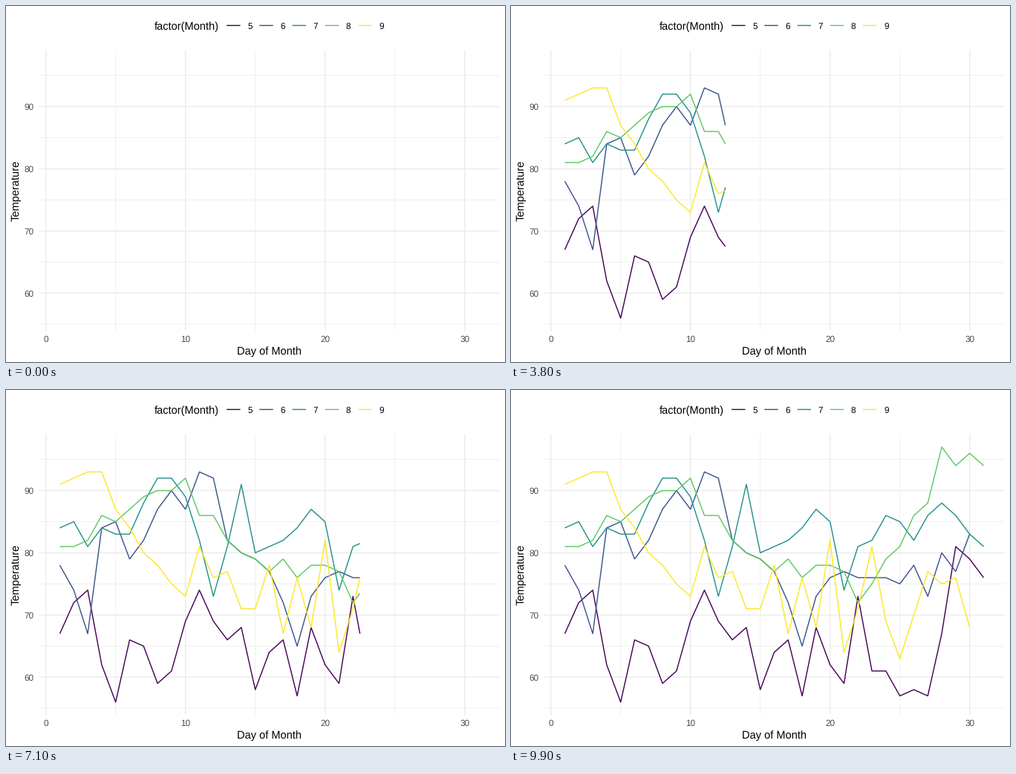
Recreate the animation shown at these times as a matplotlib script. Size 672 by 480 pixels, loop 10000 ms.

```python
import numpy as np
import matplotlib.pyplot as plt
from matplotlib.animation import FuncAnimation

plt.rcParams.update({
    "font.family": "Liberation Sans",
    "text.hinting": "none",
    "path.snap": False,
    "lines.solid_capstyle": "butt",
    "lines.solid_joinstyle": "round",
})

W, H, DPI = 672, 480, 96
FRAMES, INTERVAL = 100, 100
LEFT, RIGHT, TOP, BOTTOM = 44.27, 664.67, 59.7, 438.0
THICK, THIN = 1.067, 0.533
GRID, TICK = "#ebebeb", "#4d4d4d"

may = [67, 72, 74, 62, 56, 66, 65, 59, 61, 69, 74, 69, 66, 68, 58, 64,
       66, 57, 68, 62, 59, 73, 61, 61, 57, 58, 57, 67, 81, 79, 76]
june = [78, 74, 67, 84, 85, 79, 82, 87, 90, 87, 93, 92, 82, 80, 79,
        77, 72, 65, 73, 76, 77, 76, 76, 76, 75, 78, 73, 80, 77, 83]
july = [84, 85, 81, 84, 83, 83, 88, 92, 92, 89, 82, 73, 81, 91, 80, 81,
        82, 84, 87, 85, 74, 81, 82, 86, 85, 82, 86, 88, 86, 83, 81]
august = [81, 81, 82, 86, 85, 87, 89, 90, 90, 92, 86, 86, 82, 80, 79, 77,
          79, 76, 78, 78, 77, 72, 75, 79, 81, 86, 88, 97, 94, 96, 94]
september = [91, 92, 93, 93, 87, 84, 80, 78, 75, 73, 81, 76, 77, 71, 71,
             78, 67, 76, 68, 82, 64, 71, 81, 69, 63, 70, 77, 75, 76, 68]
temps = [may, june, july, august, september]
colors = ["#440154", "#3b528b", "#21908c", "#5dc863", "#fde725"]

# Each day lands on a whole frame, with even steps in between.
DAYS = np.arange(1, 32)
DAY_FRAMES = [round((d - 1) * (FRAMES - 1) / 30) for d in DAYS]


def px(day):
    return LEFT + (np.asarray(day) + 0.5) / 33 * (RIGHT - LEFT)


def py(temp):
    return TOP + (99.05 - np.asarray(temp)) / 45.1 * (BOTTOM - TOP)


fig = plt.figure(figsize=(W / DPI, H / DPI), dpi=DPI, facecolor="white")
ax = fig.add_axes([0, 0, 1, 1])
ax.axis("off")


def label(x, y, text, size=11, color="black", ha="left", **kw):
    ax.text(x, y, text, size=size, color=color, ha=ha, va="baseline", **kw)


def draw_grid(days, degrees, width):
    for t in degrees:
        ax.plot([LEFT, RIGHT], [py(t)] * 2, color=GRID, lw=width)
    for d in days:
        ax.plot([px(d)] * 2, [TOP, BOTTOM], color=GRID, lw=width)


draw_grid((5, 15, 25), range(55, 96, 10), THIN)
draw_grid((0, 10, 20, 30), range(60, 91, 10), THICK)

for d in (0, 10, 20, 30):
    label(px(d), 453, str(d), 8.8, TICK, "center")
for t in (60, 70, 80, 90):
    label(37.67, py(t) + 4.2, str(t), 8.8, TICK, "right")

mid_x, mid_y = (LEFT + RIGHT) / 2, (TOP + BOTTOM) / 2
label(mid_x, 470, "Day of Month", ha="center")
ax.text(18, mid_y, "Temperature", size=11, rotation=90, ha="right",
        va="center", rotation_mode="default").remove()
label(18, mid_y, "Temperature", ha="center", rotation=90,
      rotation_mode="anchor")

label(200.2, 32, "factor(Month)")
for i, color in enumerate(colors):
    x = 297.1 + 44.22 * i
    ax.plot([x, x + 18.43], [26.3, 26.3], color=color, lw=THICK)
    label(x + 28.1, 31, str(5 + i), 8.8)

lines = [ax.plot([], [], color=c, lw=THICK)[0] for c in colors]
ax.set_xlim(0, W)
ax.set_ylim(H, 0)


def update(frame):
    now = np.interp(frame, DAY_FRAMES, DAYS)
    for line, temp in zip(lines, temps):
        days = DAYS[:len(temp)]
        past = days[days < now]
        xs = np.append(past, min(now, days[-1])) if now > 1 else []
        line.set_data(px(xs), py(np.interp(xs, days, temp)))
    return lines


anim = FuncAnimation(fig, update, frames=FRAMES, interval=INTERVAL,
                     init_func=lambda: update(0), repeat=True)
plt.show()
```
